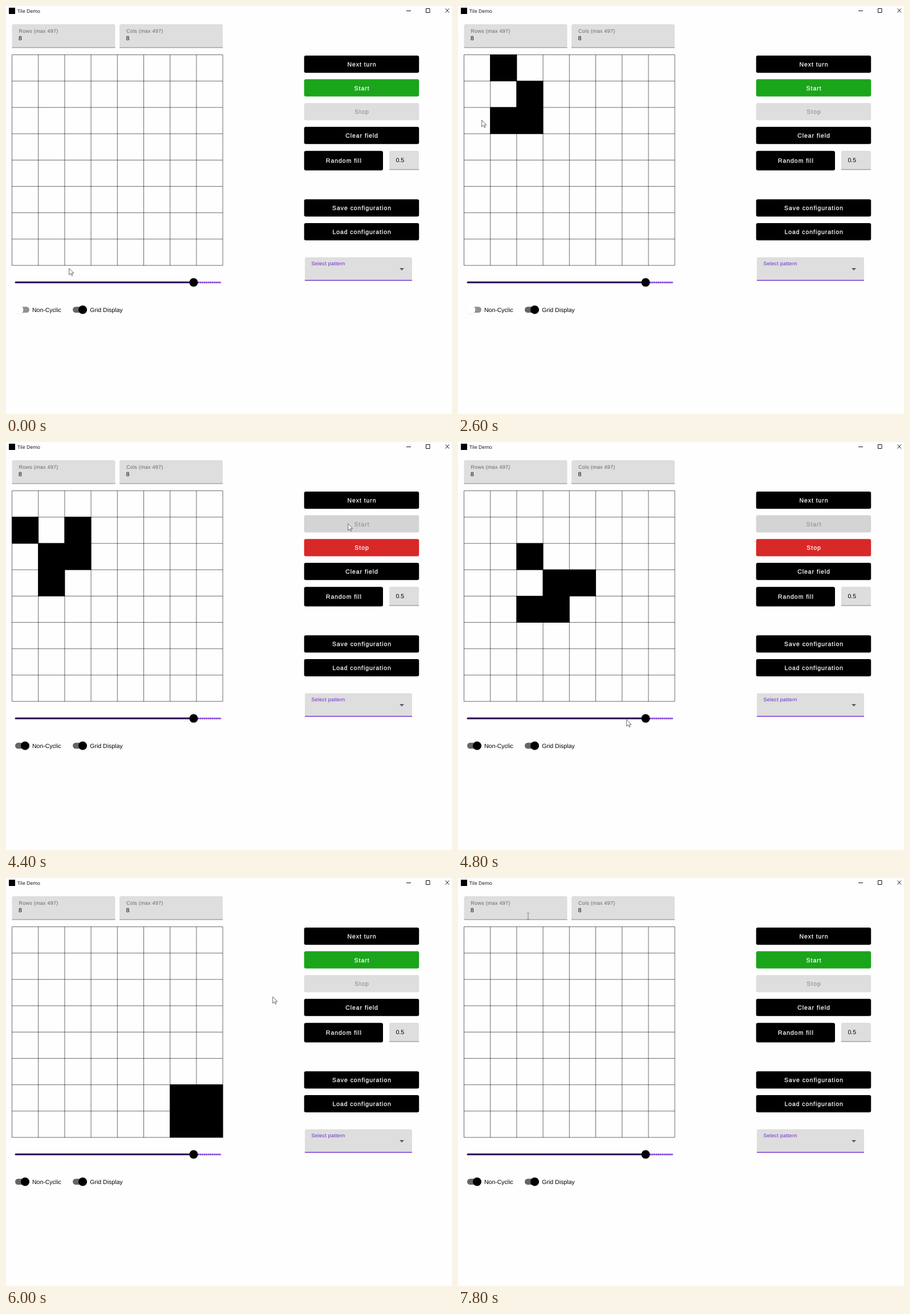
Recreate the animation shown at these times as an HTML page. Size 782x716 px, loop 8 s.

```html
<!DOCTYPE html>
<html lang="en">
<head>
<meta charset="utf-8">
<title>Tile Demo</title>
<style>
  html, body { margin: 0; width: 100%; height: 100%; overflow: hidden; background: #fefefe; }
  svg { display: block; width: 782px; height: 716px; font: 10.5px "Liberation Sans", Arial, sans-serif; text-rendering: geometricPrecision; }
  .button text { fill: #fff; stroke: #fff; stroke-width: .25px; letter-spacing: .94px; text-anchor: middle; }
  .off rect { fill: #dedede; }
  .off text { fill: #989898; stroke: #989898; }
  .label { font-size: 9px; letter-spacing: .25px; fill: #666; }
  .window { fill: none; stroke: #111; }
</style>
</head>
<body>
<svg viewBox="0 0 782 716">
  <rect x="5" y="3" width="11" height="11"/>
  <text x="20" y="12" style="font: 8.5px 'Open Sans', sans-serif">Tile Demo</text>
  <path class="window" d="M702 8.5h8M736.5 4.5h6.5v7h-6.5zM770.5 4.5l6.5 7M777 4.5l-6.5 7"/>

  <g id="fields"></g>
  <path id="lines" fill="none" stroke="#000" stroke-opacity=".58"/>
  <path id="cells"/>
  <g id="buttons"></g>

  <path d="M524 482v-38q0-3 3-3h182q3 0 3 3v38z" fill="#dedede"/>
  <path d="M524 481.5h188" stroke="#7431d8" stroke-width="1.6"/>
  <text class="label" x="535.6" y="455.3" style="fill:#6d28c9">Select pattern</text>
  <path d="M690 460h8l-4 4z" fill="#555"/>

  <path d="M17 485.1h312" stroke="#210746" stroke-width="3" stroke-linecap="round"/>
  <path d="M17 485.1h312" stroke="#3a1872" stroke-width="1.2" stroke-dasharray="1.2 2.4"/>
  <path d="M329 485.1h48" stroke="#b796ec" stroke-width="2.4"/>
  <path d="M329 485.1h48" stroke="#7a35d6" stroke-width="2.6" stroke-dasharray="2.4 1.2"/>
  <circle cx="329" cy="485.1" r="7.5"/>

  <circle id="halo" cy="533" r="18" fill="#000" opacity=".07"/>
  <rect id="track" y="527.8" height="10.5" width="25" x="16" rx="5.2"/>
  <circle cx="23" cy="533.8" r="7.7" id="shadow" fill="#000" opacity=".07"/>
  <circle id="thumb" cy="533" r="7.5"/>
  <text x="46" y="536.8">Non-Cyclic</text>
  <rect x="117" y="527.8" width="25" height="10.5" rx="5.2" fill="#666"/>
  <circle cx="134.5" cy="533" r="7.5"/>
  <text x="147.3" y="536.8">Grid Display</text>

  <path id="arrow" d="M-.3.3v11.6l2.7-2.5 1.9 4 1.7-.8-1.8-3.8h3.7z" fill="#fff" stroke="#555" stroke-width=".9"/>
  <path id="beam" d="M-2.5.5q2 0 2.5 1q.5-1 2.5-1M0 1.5v9.5M-2.5 12q2 0 2.5-1q.5 1 2.5 1" fill="none" stroke="#777" stroke-width=".9"/>
</svg>
<script>
  const $ = id => document.getElementById(id);
  const STEP = 200, LOOP = 8000, SIZE = 8, PITCH = 46.2, LEFT = 10.5, TOP = 85.6;

  // Step numbers at which things happen
  const HOVER = 19, TOGGLE = 20, START = 22, STOP = 29, CLEAR = 38, TYPE = 39;
  const PAINT = [[7, 0, 1], [9, 1, 2], [11, 2, 2], [12, 2, 1], [14, 2, 0]];
  const PATH = [
    [0, 111, 460], [5, 34, 167], [6, 73, 95], [7, 80, 105], [9, 123, 150], [11, 123, 195],
    [12, 78, 199], [13, 42, 200], [15, 38, 204], [18, 45, 510], [19, 32, 528], [20, 31, 528],
    [22, 600, 143], [24, 296, 487], [26, 310, 470], [29, 600, 186], [30, 468, 208],
    [33, 420, 330], [36, 500, 250], [38, 590, 227], [39, 123, 61]
  ];

  const field = (x, y, w, h, value, valueX, valueY, label) =>
    `<path d="M${x} ${y + h}v${3 - h}q0-3 3-3h${w - 6}q3 0 3 3v${h - 3}z" fill="#dedede"/>
     <path d="M${x} ${y + h - .5}h${w}" stroke="#888"/>
     <text x="${valueX}" y="${valueY}">${value}</text>` +
    (label ? `<text class="label" x="${valueX + .5}" y="46.7">${label}</text>` : '');

  const button = (label, y, h = 30.2, w = 201.5) =>
    `<g class="button" id="${label.split(' ')[0]}"><rect x="522.7" y="${y}" width="${w}" height="${h}" rx="3"/>
     <text x="${523.3 + w / 2}" y="${y + h / 2 + 3.8}">${label}</text></g>`;

  $('fields').innerHTML =
    field(10.5, 32, 181, 41.5, 8, 22, 59.8, 'Rows (max 497)') +
    field(199, 32, 181, 41.5, 8, 210.5, 59.8, 'Cols (max 497)') +
    field(672, 254, 52, 33.5, '0.5', 683.5, 273.5);

  $('buttons').innerHTML =
    button('Next turn', 87) + button('Start', 128.6) + button('Stop', 170.3) +
    button('Clear field', 212) + button('Random fill', 254.2, 34.2, 138.3) +
    button('Save configuration', 339.3) + button('Load configuration', 381);

  let grid = '';
  for (let i = 0; i <= SIZE; i++) {
    const at = i * PITCH;
    grid += `M${LEFT + at} ${TOP}v${SIZE * PITCH}M${LEFT} ${TOP + at}h${SIZE * PITCH}`;
  }
  $('lines').setAttribute('d', grid);

  const key = (r, c) => r * SIZE + c;

  function evolve(live) {
    const next = new Set();
    for (let r = 0; r < SIZE; r++) for (let c = 0; c < SIZE; c++) {
      let n = 0;
      for (let y = Math.max(0, r - 1); y <= Math.min(SIZE - 1, r + 1); y++)
        for (let x = Math.max(0, c - 1); x <= Math.min(SIZE - 1, c + 1); x++)
          if ((y !== r || x !== c) && live.has(key(y, x))) n++;
      if (n === 3 || (n === 2 && live.has(key(r, c)))) next.add(key(r, c));
    }
    return next;
  }

  function cellsAt(step) {
    if (step >= CLEAR) return new Set();
    let live = new Set(PAINT.filter(p => step >= p[0]).map(p => key(p[1], p[2])));
    if (step >= START) {
      const turns = Math.floor(1 + 3.2 * (Math.min(step, STOP) - START));
      for (let i = 0; i < turns; i++) live = evolve(live);
    }
    return live;
  }

  function cursorAt(step) {
    const i = PATH.findIndex(p => p[0] >= step);
    const b = PATH[i], a = PATH[Math.max(0, i - 1)];
    const k = b === a ? 0 : (step - a[0]) / (b[0] - a[0]);
    return [a[1] + (b[1] - a[1]) * k, a[2] + (b[2] - a[2]) * k];
  }

  const show = (id, on) => { $(id).style.display = on ? '' : 'none'; };

  function setButton(id, on, color) {
    $(id).setAttribute('class', on ? 'button' : 'button off');
    $(id).firstChild.style.fill = color;
  }

  function draw(step) {
    $('cells').setAttribute('d', [...cellsAt(step)].map(k => {
      const x = LEFT + (k % SIZE) * PITCH - .5;
      const y = TOP + Math.floor(k / SIZE) * PITCH - .5;
      return `M${x} ${y}h47v47h-47z`;
    }).join(''));

    const running = step >= START && step < STOP;
    setButton('Start', !running, running ? '#d4d4d4' : '#1ba51b');
    setButton('Stop', running, running ? '#d92828' : '#dedede');

    const on = step >= TOGGLE, hover = step === HOVER || step === TOGGLE;
    const x = on ? 33.5 : 23;
    $('track').setAttribute('fill', on ? '#666' : '#929292');
    $('thumb').setAttribute('cx', x);
    $('thumb').setAttribute('fill', on ? '#000' : hover ? '#eee' : '#fff');
    $('halo').setAttribute('cx', x);
    show('halo', hover);
    show('shadow', !on);

    const typing = step >= TYPE;
    const [cx, cy] = cursorAt(step);
    show('arrow', !typing);
    show('beam', typing);
    $(typing ? 'beam' : 'arrow').setAttribute('transform', `translate(${cx} ${cy})`);
  }

  let shown = -1;
  function tick() {
    const step = Math.floor(performance.now() % LOOP / STEP);
    if (step !== shown) draw(shown = step);
    requestAnimationFrame(tick);
  }
  tick();
</script>
</body>
</html>
```
